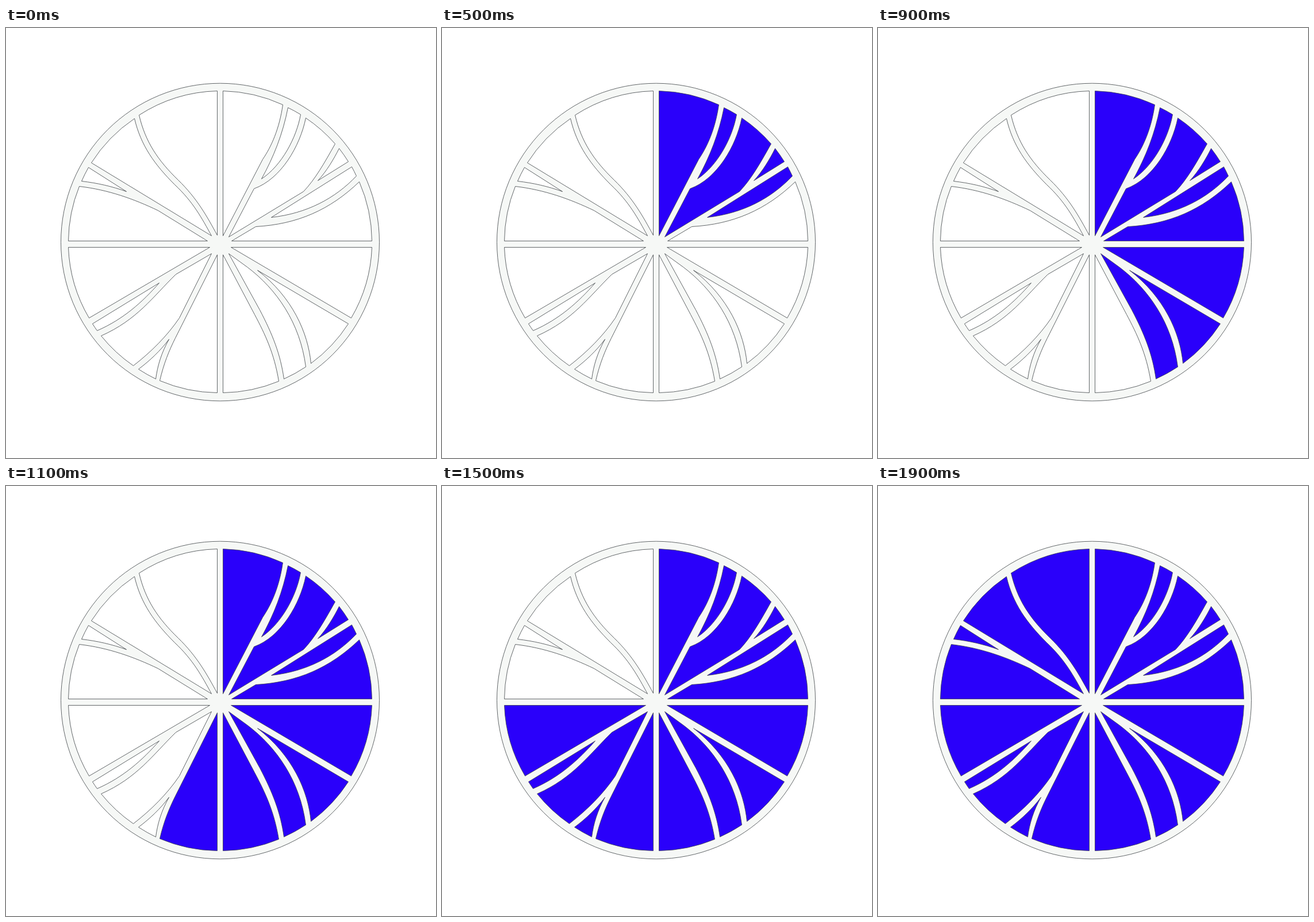
An HTML page that plays this animation: 748 px wide and 748 px high, repeating every 2000 ms.

```html
<!DOCTYPE html>
<html lang="en">
<head>
<meta charset="utf-8">
<title>Filling wheel</title>
<style>
  html, body { margin: 0; width: 100%; height: 100%; overflow: hidden; background: #fff; }
  svg { display: block; width: 100%; height: 100%; }
  .disc, .cell { stroke: #3c4044; stroke-width: .8; }
  .disc { fill: #f6f8f6; }
  .cell { fill: #fff; }
</style>
</head>
<body>
<svg viewBox="0 0 748 748">
  <g id="wheel" transform="translate(.5 .5)">
    <ellipse class="disc" cx="372" cy="372" rx="277" ry="276.3"/>
  </g>
</svg>
<script>
  const LOOP = 2000, STEP = 100, BLUE = '#2a00fa';

  // Cells clockwise from the top; "R x y" runs along the inner rim to that point.
  const cells = [
    'M377 361 V109 R481 133 C475 175 461 206 446 228 Z',
    'M444 262 C465 224 481 184 490 138 R512 150 C505 190 479 239 444 262 Z',
    'M387 363 L431 279 C478 262 511 205 521 156 R572 201 C553 235 537 263 517 284 Z',
    'M542 265 C557 249 570 227 579 209 R595 232 Z',
    'M461 329 L601 241 R609 257 C572 296 523 322 461 329 Z',
    'M392 370 L434 345 C506 341 563 316 614 267 R636 370 Z',
    'M391 381 H636 R600 504 Z',
    'M437 421 L595 514 R530 583 C525 530 498 468 437 421 Z',
    'M387 392 L420 416 C470 454 511 512 521 589 R483 610 C477 567 463 532 441 490 Z',
    'M377 394 L432 498 C450 532 466 565 474 614 R377 634 Z',
    'M367 394 V634 R267 613 C274 583 283 561 294 539 Z',
    'M283 541 C270 564 263 587 260 610 R230 593 C250 578 268 561 283 541 Z',
    'M357 392 L301 504 C280 535 252 563 221 587 R165 535 C228 507 255 467 295 428 Z',
    'M266 443 C237 476 204 506 158 526 R150 514 Z',
    'M354 381 L144 504 R108 381 Z',
    'M108 370 R127 275 C178 281 222 297 264 317 L350 370 Z',
    'M209 284 C184 275 158 269 131 266 R143 242 Z',
    'M148 234 R223 157 C234 204 258 237 293 272 C325 302 340 330 357 361 Z',
    'M367 360 C349 327 332 296 299 264 C264 230 242 198 231 151 R367 109 Z'
  ];

  const wheel = document.getElementById('wheel');

  cells.forEach((shape, i) => {
    const cell = document.createElementNS(wheel.namespaceURI, 'path');
    cell.setAttribute('class', 'cell');
    cell.setAttribute('d', shape.replace('R', 'A264 263 0 0 1 '));
    wheel.append(cell);
    cell.animate([
      { fill: '#fff', offset: 0, easing: 'step-end' },
      { fill: BLUE, offset: (i + 1) * STEP / LOOP },
      { fill: BLUE, offset: 1 }
    ], { duration: LOOP, iterations: Infinity });
  });
</script>
</body>
</html>
```
